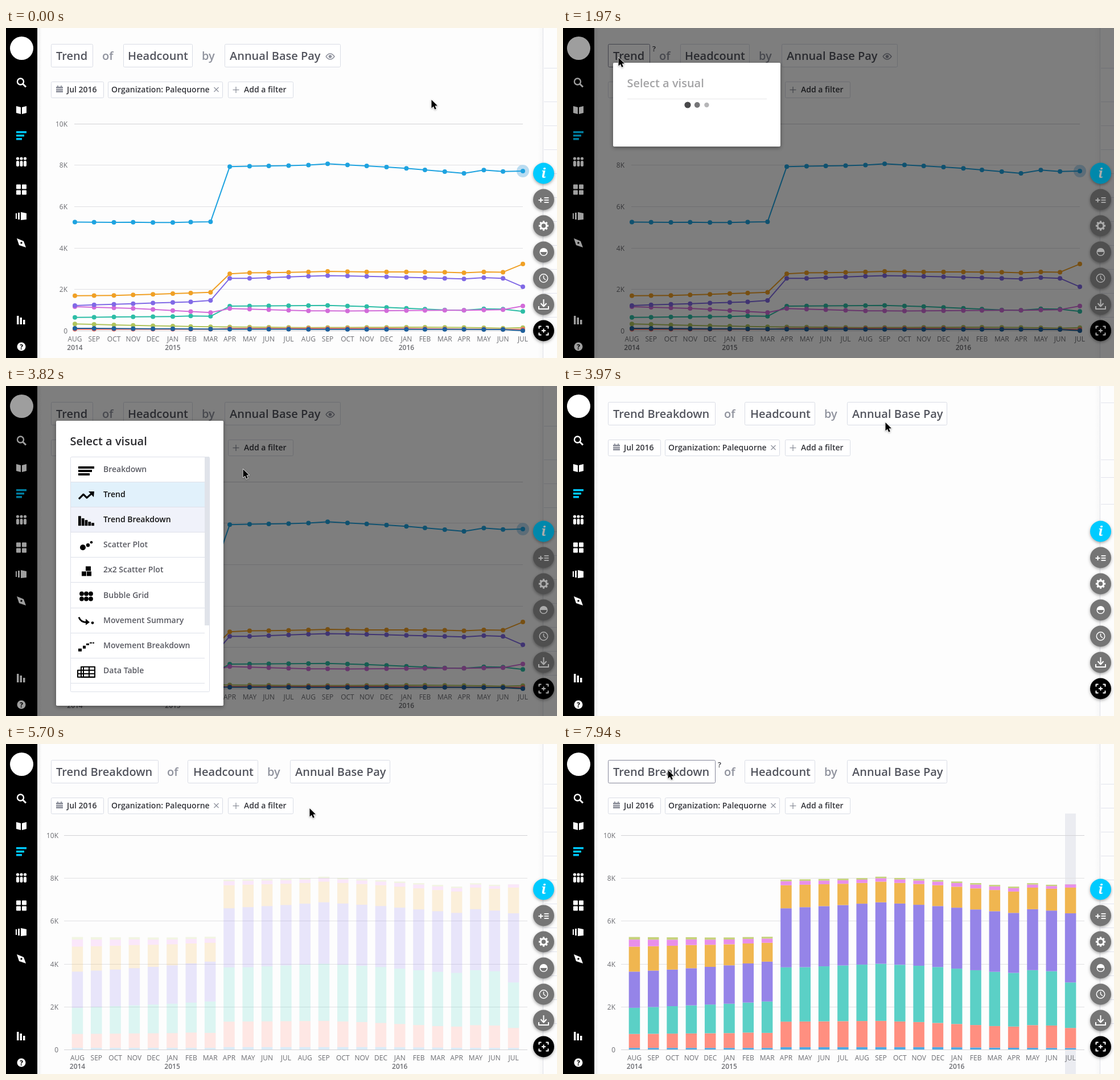
Recreate the animation shown at these times as an HTML page with a canvas. Size 968 by 579 pixels, loop 8 s.

```html
<!DOCTYPE html>
<html lang="en">
<head>
<meta charset="utf-8">
<title>Headcount trend</title>
<style>
html, body { margin: 0; width: 100%; height: 100%; overflow: hidden; background: #fdfdfd; }
canvas { display: block; }
</style>
</head>
<body>
<canvas id="stage" width="968" height="579"></canvas>
<script>
const c = document.getElementById('stage').getContext('2d');
const LOOP = 8000, TAU = Math.PI * 2;
const MONTHS = 'JAN FEB MAR APR MAY JUN JUL AUG SEP OCT NOV DEC'.split(' ');
const VISUALS = ['Breakdown', 'Trend', 'Trend Breakdown', 'Scatter Plot', '2x2 Scatter Plot',
  'Bubble Grid', 'Movement Summary', 'Movement Breakdown', 'Data Table'];

// Pay bands in stacking order; keys are month, value pairs.
const BANDS = [
  { line: '#f4695e', bar: '#4fa8e2', keys: [0,75, 7,75, 8,110, 16,110, 20,80, 23,70] },
  { line: '#2dbda6', bar: '#ff8f80', keys: [0,650, 5,690, 6,715, 7,700, 8,1190, 13,1225, 15,1170, 19,1005, 20,990, 21,1060, 22,1045, 23,935] },
  { line: '#8069e6', bar: '#5bd0c6', keys: [0,1220, 6,1400, 7,1465, 8,2535, 9,2535, 13,2665, 16,2610, 20,2505, 21,2565, 22,2535, 23,2125] },
  { line: '#f0a025', bar: '#9584e8', keys: [0,1690, 2,1710, 4,1760, 7,1860, 8,2755, 9,2800, 11,2820, 13,2870, 15,2845, 17,2845, 19,2830, 20,2800, 21,2845, 22,2830, 23,3225] },
  { line: '#d26cd9', bar: '#f0b650', keys: [0,1165, 3,1080, 7,880, 8,1075, 12,965, 14,960, 20,995, 22,1020, 23,1200] },
  { line: '#b0c45c', bar: '#e88fea', keys: [0,330, 4,240, 7,195, 12,155, 18,175, 20,160, 22,125, 23,150] },
  { line: '#1f609c', bar: '#c6d27c', keys: [0,120, 7,85, 8,75, 20,70, 22,60, 23,5] }
];

function sample(keys, m) {
  let i = 0;
  while (i + 4 < keys.length && keys[i + 2] < m) i += 2;
  const f = (m - keys[i]) / (keys[i + 2] - keys[i]);
  return keys[i + 1] + (keys[i + 3] - keys[i + 1]) * f;
}
const range = [...Array(24).keys()];
for (const b of BANDS) b.values = range.map(m => sample(b.keys, m));
const totals = range.map(m => BANDS.reduce((sum, b) => sum + b.values[m], 0));

// Drawing helpers
function text(s, x, y, size, color, weight = 600, align = 'left') {
  c.font = `${weight} ${size}px "Open Sans", sans-serif`;
  c.textAlign = align;
  c.fillStyle = color;
  c.fillText(s, x, y);
}
function rect(x, y, w, h, color) { c.fillStyle = color; c.fillRect(x, y, w, h); }
function disc(x, y, r, color) {
  c.beginPath(); c.arc(x, y, r, 0, TAU); c.fillStyle = color; c.fill();
}
function ring(x, y, r, color, w) {
  c.beginPath(); c.arc(x, y, r, 0, TAU); c.lineWidth = w; c.strokeStyle = color; c.stroke();
}
function trace(pts) {
  c.beginPath();
  for (let i = 0; i < pts.length; i += 2) c.lineTo(pts[i], pts[i + 1]);
}
function path(pts, color, w) { trace(pts); c.lineWidth = w; c.strokeStyle = color; c.stroke(); }
function poly(pts, color) { trace(pts); c.closePath(); c.fillStyle = color; c.fill(); }
function button(x, y, w, h, border = '#d9dce5') {
  c.beginPath(); c.roundRect(x + .5, y + .5, w, h, 2);
  c.fillStyle = '#fff'; c.fill();
  c.lineWidth = 1; c.strokeStyle = border; c.stroke();
}
function shadow(blur, alpha, dy) {
  c.shadowBlur = blur; c.shadowOffsetY = dy; c.shadowColor = `rgba(0,0,0,${alpha})`;
}
function fade(x, w, from, to) {
  const g = c.createLinearGradient(x, 0, x + w, 0);
  g.addColorStop(0, `rgba(0,0,0,${from})`);
  g.addColorStop(1, `rgba(0,0,0,${to})`);
  rect(x, 0, w, 579, g);
}

// Cursor moves: start, end, number of steps, x, y
const MOVES = [
  [600, 1520, 7, 103, 54], [1670, 1670, 1, 97, 52], [2420, 2920, 4, 287, 253],
  [3070, 3220, 2, 236, 240], [3820, 3820, 1, 416, 146], [3970, 3970, 1, 566, 64],
  [4480, 4480, 1, 533, 113], [6890, 6890, 1, 534, 113], [7190, 7940, 6, 184, 46]
];
function cursorAt(t) {
  let x = 747, y = 126;
  for (const [start, end, n, tx, ty] of MOVES) {
    if (t < start) break;
    const gap = (end - start) / (n - 1) || 1;
    const f = Math.min(1, (Math.floor((t - start) / gap + .001) + 1) / n);
    const e = f * f * (3 - 2 * f);
    x += (tx - x) * e;
    y += (ty - y) * e;
  }
  return [x, y];
}
function drawCursor([x, y]) {
  c.save();
  c.translate(x, y);
  trace([.5, 0, .5, 14.5, 4, 11.5, 6.2, 16.8, 8.8, 15.7, 6.5, 10.5, 11, 10.3]);
  c.closePath();
  shadow(3, .35, 1);
  c.lineWidth = 1.6; c.strokeStyle = '#fff'; c.stroke();
  c.shadowColor = 'transparent';
  c.fillStyle = '#000'; c.fill();
  c.restore();
}

// Page header
function drawTitle(breakdown, hover) {
  const dark = '#53555e', soft = '#8f929d', edge = hover ? '#85879a' : undefined;
  const put = (s, x, color = dark) => text(s, x, 56, 20, color);
  if (breakdown) {
    button(79, 28, 188, 40, edge); put('Trend Breakdown', 88);
    put('of', 283, soft);
    button(319, 28, 123, 40); put('Headcount', 329);
    put('by', 459, soft);
    button(499, 28, 175, 40); put('Annual Base Pay', 508);
  } else {
    button(79, 28, 73, 40, edge); put('Trend', 88);
    put('of', 169, soft);
    button(206, 28, 121, 40); put('Headcount', 214);
    put('by', 344, soft);
    button(384, 28, 203, 40); put('Annual Base Pay', 393);
    c.beginPath();
    c.moveTo(562, 50); c.quadraticCurveTo(569.5, 40, 577, 50); c.quadraticCurveTo(569.5, 60, 562, 50);
    c.lineWidth = 1.6; c.strokeStyle = soft; c.stroke();
    disc(569.5, 50, 2.8, soft);
  }
  if (hover) text('?', breakdown ? 272 : 157, 41, 13, '#3a3b42');
}
function drawFilters() {
  const ink = '#35363c', soft = '#8f929d';
  button(79, 94, 92, 28);
  rect(88, 103, 12, 3, soft); rect(88, 107, 12, 6, soft);
  rect(90, 101, 2, 3, soft); rect(96, 101, 2, 3, soft); rect(88, 109.5, 12, .7, '#fff');
  text('Jul 2016', 107, 113, 14, ink);
  button(179, 94, 201, 28);
  text('Organization: Palequorne', 185, 113, 14, ink);
  path([365.5, 104, 373.5, 112], soft, 1.2); path([373.5, 104, 365.5, 112], soft, 1.2);
  button(390, 94, 114, 28);
  path([398.5, 108.5, 409.5, 108.5], soft, 1.3); path([404, 103, 404, 114], soft, 1.3);
  text('Add a filter', 418, 113, 14, ink);
}

// Charts
function drawAxes(left, right, top, base, xAt) {
  for (let k = 0; k <= 5; k++) {
    const y = Math.round(base - (base - top) * k / 5);
    rect(left, y, right - left, 1, k % 5 ? '#e0e0e3' : '#d2d2d5');
    text(k ? k * 2 + 'K' : '0', left - (left > 110 ? 12 : 10), y + 4.5, 12, '#6c6d72', 400, 'right');
  }
  for (const m of range) {
    const name = MONTHS[(m + 7) % 12];
    text(name, xAt(m), base + 18.5, 12, '#6c6d72', 400, 'center');
    if (!m || name === 'JAN') text(2014 + Math.floor((m + 7) / 12), xAt(m), base + 33.5, 12, '#6c6d72', 600, 'center');
  }
}
const monthEnd = m => Date.UTC(2014, 8 + m, 0);
const lineX = m => 121 + 787 * (monthEnd(m) - monthEnd(0)) / (monthEnd(23) - monthEnd(0));
const barX = m => 125.5 + 33.31 * m;

function drawLines() {
  drawAxes(120, 908, 167.5, 531, lineX);
  const yAt = v => 531.3 - v * .03635;
  disc(lineX(23), yAt(totals[23]), 11, '#b9dcf1');
  c.lineJoin = 'round';
  const plot = (values, color) => {
    path(values.flatMap((v, m) => [lineX(m), yAt(v)]), color, 2);
    values.forEach((v, m) => disc(lineX(m), yAt(v), 4, color));
  };
  for (const i of [5, 0, 6, 1, 4, 2, 3]) plot(BANDS[i].values, BANDS[i].line);
  plot(totals, '#1ea3e0');
}
function drawBars(alpha, mark) {
  if (mark) rect(882, 122, 19, 457, '#ebecf1');
  drawAxes(102, 916, 160, 536, barX);
  c.globalAlpha = alpha;
  for (const m of range) {
    let sum = 0;
    for (const b of BANDS) {
      const y0 = 536 - sum * .0376;
      sum += b.values[m];
      const y1 = 536 - sum * .0376;
      rect(barX(m) - 9.8, y1, 19.5, y0 - y1, b.bar);
    }
  }
  c.globalAlpha = 1;
}

// Side areas
function drawSidebar() {
  const w = '#fff';
  fade(55, 8, .07, 0);
  rect(0, 0, 55, 579, '#000');
  disc(27.5, 35.5, 20.5, w);
  ring(25.5, 94, 5.5, w, 2.4); path([29.5, 98, 35, 103.5], w, 3);
  poly([18, 137, 26, 139, 26, 151, 18, 149], w); poly([28, 139, 36, 137, 36, 149, 28, 151], w);
  [18, 14, 10].forEach((len, i) => rect(18, 181 + i * 6, len, 3.5, '#00c8ff'));
  for (const x of [20.5, 27, 33.5]) {
    disc(x, 229, 2.6, w);
    c.beginPath(); c.roundRect(x - 2.5, 233, 5, 10, 2); c.fill();
  }
  for (const x of [18, 28]) for (const y of [274.5, 284.5]) {
    c.beginPath(); c.roundRect(x, y, 8, 8, 1); c.fillStyle = w; c.fill();
  }
  rect(17, 325, 2, 10, w); rect(21, 324, 3, 12, w); poly([26, 323, 36, 325, 36, 336, 26, 337], w);
  poly([19, 369, 31, 374, 35, 385, 23, 381], w); disc(27, 377, 1.7, '#000');
  rect(19, 505, 3.5, 15, w); rect(24.5, 508, 3.5, 12, w); rect(30, 512, 3.5, 8, w);
  disc(27, 559, 7.5, w); text('?', 27, 563.5, 12, '#000', 700, 'center');
}
function drawRightPanel(t) {
  fade(934, 9, 0, .025);
  rect(943, 0, 1, 579, '#dfe1e8');
  const rule = y => rect(945, y, 23, 1, '#e2e3ec');
  if (t >= 3970 && t < 5550) { [29, 129, 160, 207].forEach(rule); return; }
  const first = t < 3970 ? 129 : 112;
  rule(70);
  for (let y = first; y < 525; y += 42) rule(y);
}
const TOOLS = [
  (x, y, w) => { c.font = 'italic 700 24px "Noto Serif", serif'; c.textAlign = 'center'; c.fillStyle = w; c.fillText('i', x, y + 8); },
  (x, y, w) => {
    path([x - 9, y + 1, x - 1, y + 1], w, 2); path([x - 5, y - 3, x - 5, y + 5], w, 2);
    for (const d of [-3, 1, 5]) rect(x + 1, y + d - 1, 8, 1.8, w);
  },
  (x, y, w) => {
    ring(x, y, 5.3, w, 3);
    for (let a = 0; a < 8; a++) {
      const p = Math.cos(a * TAU / 8), q = Math.sin(a * TAU / 8);
      path([x + p * 6, y + q * 6, x + p * 8.6, y + q * 8.6], w, 3.2);
    }
  },
  (x, y, w) => {
    ring(x, y, 6.3, w, 1.6);
    c.beginPath(); c.arc(x, y, 6.5, Math.PI, TAU); c.fillStyle = w; c.fill();
  },
  (x, y, w) => { ring(x, y, 7.2, w, 1.5); path([x, y - 4.5, x, y, x + 3.5, y + 3], w, 1.5); },
  (x, y, w) => {
    path([x, y - 9, x, y + 3], w, 2); path([x - 5, y - 2, x, y + 3.5, x + 5, y - 2], w, 2);
    path([x - 8.5, y + 3, x - 8.5, y + 8, x + 8.5, y + 8, x + 8.5, y + 3], w, 2);
  },
  (x, y, w) => {
    for (const sx of [-1, 1]) for (const sy of [-1, 1])
      path([x + sx * 8, y + sy * 3.5, x + sx * 8, y + sy * 7.5, x + sx * 4, y + sy * 7.5], w, 2);
    path([x - 3.5, y, x + 3.5, y], w, 2); path([x, y - 3.5, x, y + 3.5], w, 2);
  }
];
function drawTools(dim) {
  TOOLS.forEach((icon, i) => {
    const x = 944.5, y = 255 + 46 * i;
    c.save();
    shadow(5, .35, 2);
    disc(x, y, 18.5, i === 0 ? '#00cbff' : i === 6 ? '#000' : '#757575');
    c.restore();
    icon(x, y, '#fff');
    if (dim) disc(x, y, 18.5, 'rgba(0,0,0,.33)');
  });
}

// Popup icons, relative to the left edge and middle of a row
const k = '#000';
const ICONS = [
  () => { rect(0, -5, 28, 4, k); rect(0, 1, 24, 4, k); rect(0, 7, 20, 4, k); },
  () => { path([1, 8, 9, 0, 15, 6, 24, -2], k, 3.2); poly([18, -5, 28, -5, 27, 5], k); },
  () => [17, 13, 10, 7, 5].forEach((h, i) => rect(i * 5.8, 11 - h, 4.8, h, k)),
  () => { disc(8, 5, 5, k); disc(17, 1, 3.2, k); disc(23, -4, 2.3, k); },
  () => { rect(6, 3, 8, 8, k); rect(15, 3, 8, 8, k); rect(13, -6, 9, 8, k); },
  () => { for (const x of [6, 14, 22]) for (const y of [-2, 7]) disc(x, y, 3.9, k); },
  () => {
    c.beginPath(); c.moveTo(1, -5); c.quadraticCurveTo(4, 4, 15, 4);
    c.lineWidth = 3; c.strokeStyle = k; c.stroke();
    poly([13, -2, 20, 4, 13, 9], k); disc(25, 5, 2.4, k);
  },
  () => { rect(0, 6, 6, 5, k); rect(8, 1, 5, 5, k); rect(14, -3, 5, 3, k); rect(20, -5, 4, 2, k); rect(25, -5, 3, 2, k); },
  () => {
    c.lineWidth = 2; c.strokeStyle = k;
    c.strokeRect(5, -6, 24, 18); c.strokeRect(-1, 0, 30, 12);
    path([-1, 6, 29, 6], k, 2); path([9, -6, 9, 12], k, 2); path([19, -6, 19, 12], k, 2);
  }
];
function drawPopup(t, cursor) {
  const ready = t >= 2420;
  c.save();
  shadow(7, .4, 2);
  c.beginPath(); c.roundRect(88, 61, 294, ready ? 500 : 147, 2); c.fillStyle = '#fff'; c.fill();
  c.restore();
  text('Select a visual', 112.5, 104, 20, ready ? '#2b2b2f' : '#a4a4a6');
  if (!ready) {
    rect(113, 124, 245, 1, '#e6e6e8');
    const turn = Math.floor((t - 1970) / 150);
    for (let i = 0; i < 3; i++) {
      const s = (i + turn) % 3;
      disc(219 + i * 16.7, 135, 5.6 - s * .7, ['#48484a', '#757577', '#b6b6b8'][s]);
    }
    return;
  }
  button(113, 124, 244, 412, '#dde0e9');
  const over = t >= 2920 ? 2 : Math.floor((cursor[1] - 124) / 44.1);
  VISUALS.forEach((name, i) => {
    const y = 124 + 44.1 * i, on = i === 1 || i === over;
    if (on) rect(114, y + 1, 235, 43, i === 1 ? '#e1f1fb' : '#f0f2fa');
    rect(114, Math.round(y + 44), 235, 1, '#dde0e9');
    text(name, 171, y + 27, 14, on ? '#111' : '#5a5b63');
    c.save();
    c.translate(127, y + 22);
    ICONS[i]();
    c.restore();
  });
  rect(349, 124, 8, 296, '#e0e3ea');
}

function draw(t) {
  const dim = t >= 1970 && t < 3970, breakdown = t >= 3970;
  const hover = t >= 1670 && t < 2420 || t >= 7790;
  const cursor = cursorAt(t);
  rect(0, 0, 968, 579, '#fdfdfd');
  drawRightPanel(t);
  drawTitle(breakdown, hover);
  drawFilters();
  if (!breakdown) drawLines();
  else if (t >= 5220) {
    const step = 5550 + 150 * Math.floor((t - 5550 + 10) / 150);
    const f = Math.max(0, Math.min(1, (step - 5530) / 570));
    drawBars(t < 5550 ? 0 : (1 - Math.cos(Math.PI * f)) / 2, t >= 6140);
  }
  if (dim) rect(0, 0, 968, 579, 'rgba(0,0,0,.5)');
  drawSidebar();
  if (dim) rect(0, 0, 55, 579, 'rgba(0,0,0,.38)');
  drawTools(dim);
  if (dim) drawPopup(t, cursor);
  drawCursor(cursor);
}

const begin = performance.now();
function tick() {
  draw((performance.now() - begin) % LOOP);
  requestAnimationFrame(tick);
}
tick();
</script>
</body>
</html>
```
